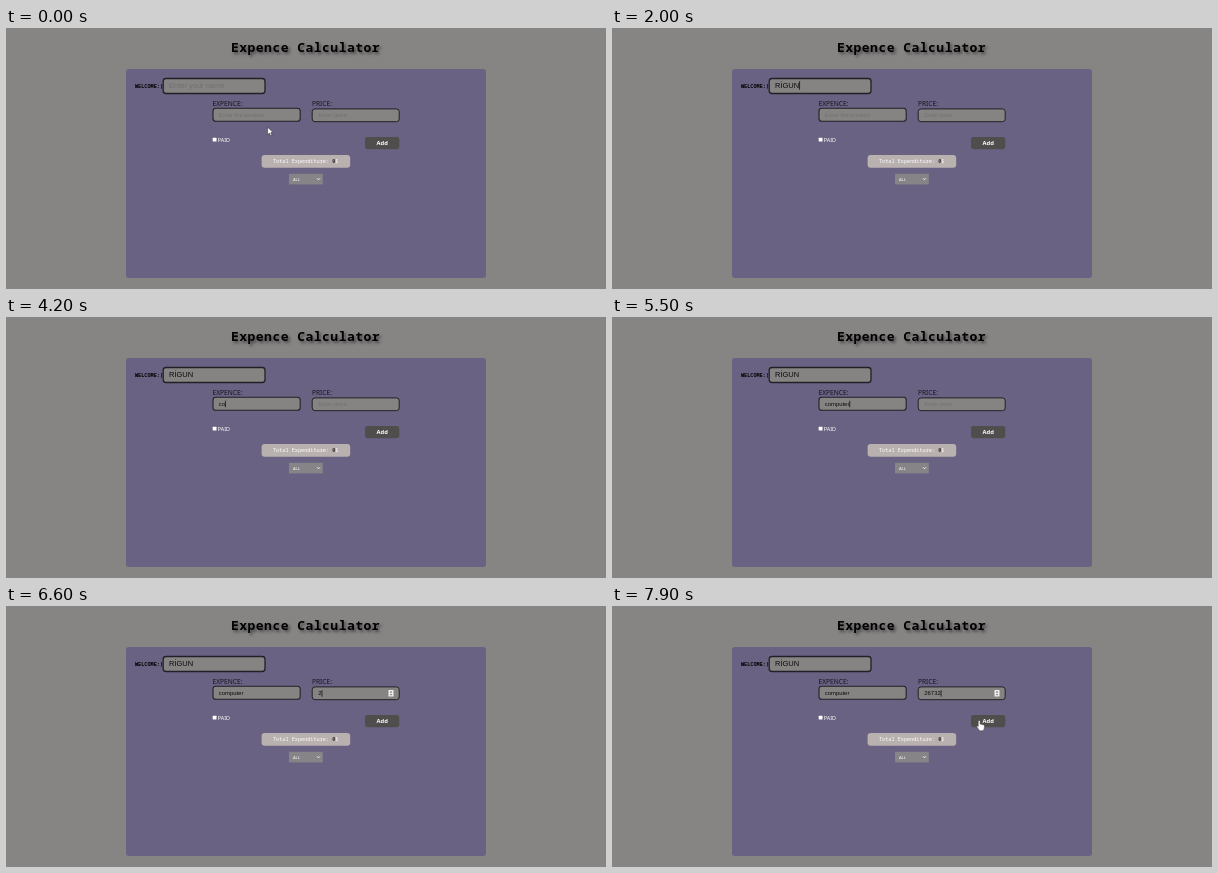
Write an HTML page that moves like this. It is 600x261 px and loops after 8000 ms.

```html
<!DOCTYPE html>
<html lang="en">
<head>
<meta charset="utf-8">
<title>Expence Calculator</title>
<style>
  html, body { margin: 0; width: 100%; height: 100%; overflow: hidden; background: #878484; }
  svg { display: block; width: 600px; height: 261px; }
  text { white-space: pre; }
  .mono { font-family: "Noto Sans Mono", "DejaVu Sans Mono", monospace; }
  .label { font-family: "Noto Sans", sans-serif; }
  .field text { font-family: "Liberation Sans", Arial, sans-serif; }
  .title { font-size: 13px; font-weight: 700; text-shadow: 2px 2px 3px rgba(0, 0, 0, .5); }
  .field rect { fill: #868383; stroke: #222026; }
  .value { fill: #0b0b0b; }
  .hint { fill: #737074; }
  .caret { stroke: #111; stroke-width: .8; }
</style>
</head>
<body>
<svg viewBox="0 0 600 261">
  <rect width="600" height="261" fill="#878484"/>
  <text class="mono title" x="225" y="24" textLength="auto" letter-spacing=".48">Expence Calculator</text>
  <rect x="120" y="41" width="360" height="209" rx="3" fill="#696282"/>

  <text class="mono" x="129" y="59.8" font-size="5.2" font-weight="700">WELCOME:)</text>
  <g class="label" font-size="6.6" fill="#17151c">
    <text x="206.6" y="78">EXPENCE:</text>
    <text x="306" y="78">PRICE:</text>
  </g>

  <g id="fields"></g>

  <g id="spinner">
    <rect x="382.5" y="84" width="5" height="6.6" rx=".6" fill="#efeeee"/>
    <path d="M383.8 86.5l1.2-1.4 1.2 1.4zM383.8 88.2l1.2 1.4 1.2-1.4z" fill="#55525a"/>
  </g>

  <rect x="206.7" y="109.8" width="3.8" height="3.8" rx=".5" fill="#fff"/>
  <text class="label" x="211.8" y="114" font-size="5.4" fill="#fff">PAID</text>

  <rect x="359" y="109" width="34.3" height="12.2" rx="2.4" fill="#504e4d"/>
  <text class="label" x="376.2" y="117" font-size="5.8" font-weight="700" fill="#fff" text-anchor="middle">Add</text>

  <rect x="255.6" y="127" width="88.6" height="12.8" rx="3" fill="#b9b0b0"/>
  <text class="mono" x="267" y="135.4" font-size="5.2" font-weight="500" fill="#fff">Total Expenditure: <tspan fill="#3b3538" font-weight="700">0</tspan>$</text>

  <rect x="283" y="145.8" width="33.8" height="10.6" fill="#878487"/>
  <text class="label" x="287" y="152.7" font-size="4.1" fill="#fff">ALL</text>
  <path d="M311 150.3l1.5 1.5 1.5-1.5" fill="none" stroke="#fff" stroke-width=".9"/>

  <g id="arrow"><path d="M0 0v7.6l1.8-1.7 1.2 2.7 1.4-.6-1.2-2.6h2.4z" fill="#fff" stroke="#222" stroke-width=".5"/></g>
  <g id="beam"><path d="M-1.2-3.6h2.4M0-3.6v7.2M-1.2 3.6h2.4" fill="none" stroke="#222" stroke-width=".7"/></g>
  <g id="hand"><path d="M1.4 0q.9 0 .9 1v2.7l3.1.6q1.3.3 1.3 1.6l-.5 2.6-.8 1.8H1.8L-.8 6.6q-.6-1 .2-1.2l1.1.8V1q0-1 .9-1z" fill="#fff" stroke="#333" stroke-width=".4"/></g>
</svg>
<script>
const LOOP = 8000;
const $ = id => document.getElementById(id);

const specs = {
  name:    { x: 157.2, y: 50.5, w: 101.8, h: 15, line: 1.3, size: 7.5, tx: 163, base: 60.2, caret: [53.3, 61.8], hint: "Enter your name" },
  product: { x: 207, y: 80.3, w: 87.2, h: 13, line: 1.1, size: 5.9, tx: 212.8, base: 88.9, caret: [83.8, 90.2], hint: "Enter the product" },
  price:   { x: 306.2, y: 80.9, w: 87, h: 12.8, line: 1, size: 5.9, tx: 312.3, base: 89.3, caret: [84.2, 90.6], hint: "Enter price" }
};

// [time, text]
const typed = {
  name: [[0, ""], [1100, "R"], [1300, "Rİ"], [1500, "RİG"], [1800, "RİGU"], [2000, "RİGUN"]],
  product: [[0, ""], [4100, "c"], [4200, "co"], [4600, "com"], [4800, "comp"], [5100, "compu"],
    [5200, "comput"], [5300, "compute"], [5500, "computer"]],
  price: [[0, ""], [6600, "2"], [6800, "26"], [6900, "2673"], [7200, "26732"]]
};

// [time, field showing the caret]
const carets = [[0, ""], [400, "name"], [700, ""], [1100, "name"], [2300, ""], [2600, "name"], [3000, ""],
  [3300, "product"], [3700, ""], [4100, "product"], [5900, ""], [6200, "price"], [7500, ""], [7800, "price"]];

// [time, pointer, x, y]
const pointers = [[0, "arrow", 261.6, 99.2], [100, ""], [2500, "beam", 212, 70], [2600, "beam", 249, 84], [2700, ""],
  [5900, "beam", 216, 86], [6000, "beam", 258, 83], [6100, "arrow", 299, 66], [6200, "beam", 334, 85], [6300, ""],
  [7800, "arrow", 350, 102], [7900, "hand", 365.8, 114.4]];

function make(tag, attrs, parent) {
  const el = document.createElementNS("http://www.w3.org/2000/svg", tag);
  for (const key in attrs) el.setAttribute(key, attrs[key]);
  return parent.appendChild(el);
}

function buildField(s) {
  const g = make("g", { class: "field" }, $("fields"));
  make("rect", { x: s.x, y: s.y, width: s.w, height: s.h, rx: 2.8, "stroke-width": s.line }, g);
  const at = { x: s.tx, y: s.base, "font-size": s.size };
  const hint = make("text", { ...at, class: "hint" }, g);
  hint.textContent = s.hint;
  const value = make("text", { ...at, class: "value" }, g);
  const caret = make("line", { class: "caret", y1: s.caret[0], y2: s.caret[1] }, g);
  return { hint, value, caret };
}

const fields = {};
for (const key in specs) fields[key] = buildField(specs[key]);

const stepAt = (steps, t) => steps.findLast(step => step[0] <= t);
const show = (el, on) => { el.style.visibility = on ? "visible" : "hidden"; };

function render(t) {
  const focus = stepAt(carets, t)[1];
  for (const key in fields) {
    const { hint, value, caret } = fields[key];
    const text = stepAt(typed[key], t)[1];
    if (value.textContent !== text) value.textContent = text;
    show(hint, !text);
    show(caret, focus === key);
    const x = specs[key].tx + (text ? value.getComputedTextLength() : 0) + .4;
    caret.setAttribute("x1", x);
    caret.setAttribute("x2", x);
  }
  show($("spinner"), t >= 6200);
  const [, kind, x, y] = stepAt(pointers, t);
  for (const id of ["arrow", "beam", "hand"]) {
    show($(id), id === kind);
    if (id === kind) $(id).setAttribute("transform", `translate(${x} ${y})`);
  }
}

const start = performance.now();
function tick(now) {
  render(Math.max(0, now - start) % LOOP);
  requestAnimationFrame(tick);
}
render(0);
requestAnimationFrame(tick);
</script>
</body>
</html>
```
